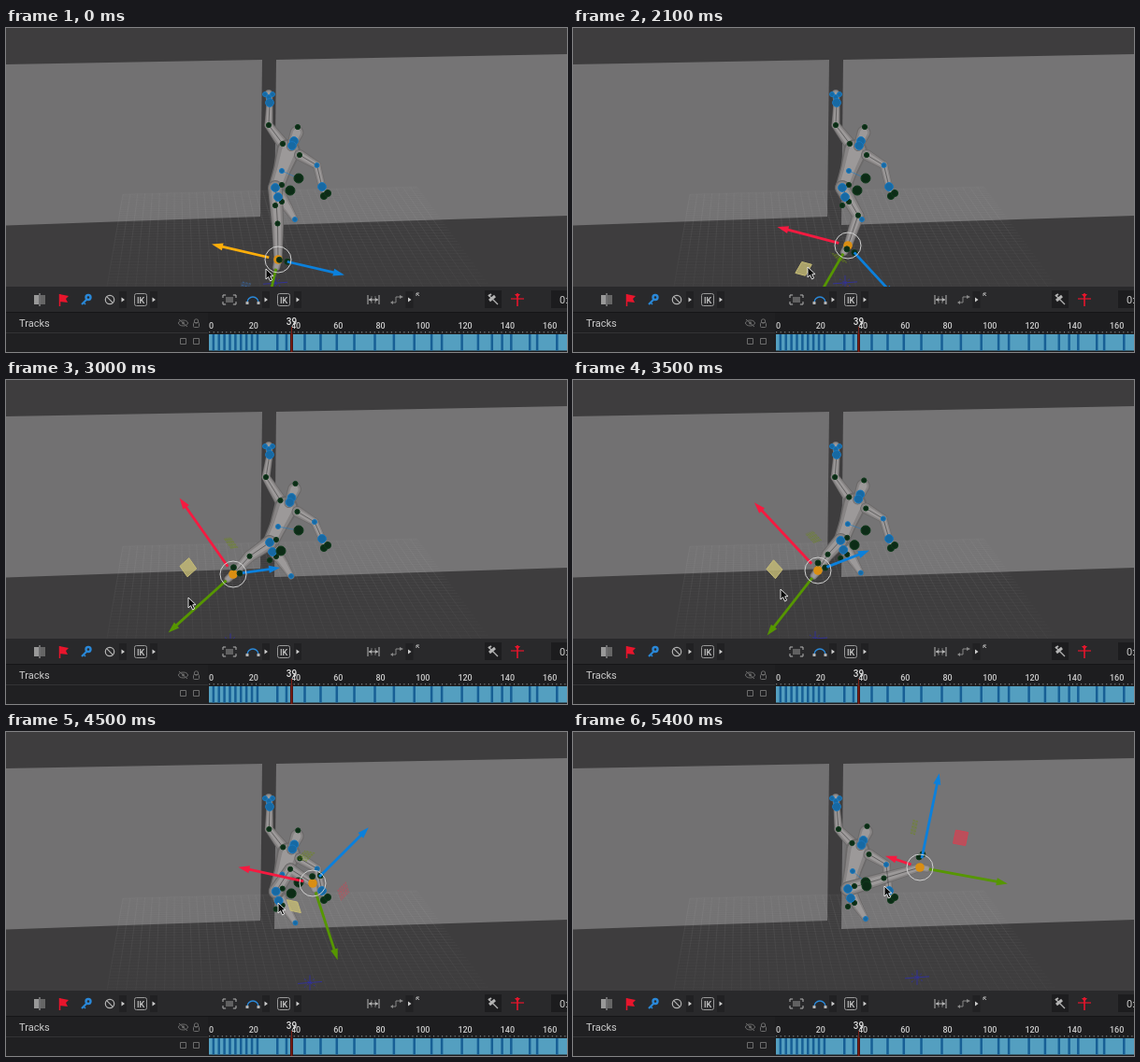
Animation, 600 px wide and 347 px high, one loop 5.5 s. Source, as an HTML page with a canvas:

```html
<!DOCTYPE html>
<html lang="en">
<head>
<meta charset="utf-8">
<title>Character rig posing</title>
<style>
html, body { margin: 0; width: 100%; height: 100%; overflow: hidden; background: #3e3d3e; }
canvas { display: block; }
</style>
</head>
<body>
<canvas id="stage" width="600" height="347"></canvas>
<script>
const LOOP = 5500, STEP = 100, VIEW_H = 277, AXIS = 103;
const c = document.getElementById('stage').getContext('2d');

// The dragged foot: position, knee bend, and gizmo orientation in degrees.
const poses = [
  { at: 600, x: 291, y: 248, bend: 1, heading: 103, tilt: 0, spin: 45, mx: 278, my: 258 },
  { at: 1200, x: 294, y: 235, bend: 13, heading: 119, tilt: 17, spin: 43, mx: 289, my: 253 },
  { at: 2100, x: 294, y: 233, bend: 14, heading: 120, tilt: 17, spin: 43, mx: 251, my: 256 },
  { at: 3000, x: 243, y: 208, bend: -3, heading: 138, tilt: -25, spin: 16, mx: 195, my: 233 },
  { at: 3500, x: 262, y: 204, bend: -2, heading: 128, tilt: -31, spin: 17, mx: 222, my: 224 },
  { at: 4500, x: 328, y: 162, bend: 20, heading: 72, tilt: -33, spin: 47, mx: 291, my: 183 },
  { at: 4900, x: 371, y: 145, bend: 0, heading: 10.5, tilt: -22, spin: 93, mx: 333, my: 165 }
];

function poseAt(t) {
  const next = Math.max(1, poses.findIndex(p => p.at > t));
  const i = t >= poses.at(-1).at ? poses.length - 1 : next;
  const a = poses[i - 1], b = poses[i];
  const k = Math.min(1, Math.max(0, (t - a.at) / (b.at - a.at)));
  return Object.fromEntries(Object.keys(a).map(key => [key, a[key] + (b[key] - a[key]) * k]));
}

const add = ([x, y], [dx, dy], k = 1) => [x + dx * k, y + dy * k];
const rad = deg => deg * Math.PI / 180;

// Screen projection of the three perpendicular gizmo axes.
function axesOf(pose) {
  const h = rad(pose.heading), s = rad(pose.spin), depth = Math.sin(rad(pose.tilt));
  const project = (along, across) => [
    AXIS * (along * Math.cos(h) - across * Math.sin(h)),
    AXIS * (along * Math.sin(h) + across * Math.cos(h))
  ];
  return {
    red: project(depth * Math.sin(s), Math.cos(s)),
    green: project(Math.cos(rad(pose.tilt)), 0),
    blue: project(depth * Math.cos(s), -Math.sin(s))
  };
}

function poly(points, fill) {
  c.fillStyle = fill;
  c.beginPath();
  points.forEach(p => c.lineTo(...p));
  c.fill();
}
function line(points, color, width = 1, close = false) {
  c.strokeStyle = color;
  c.lineWidth = width;
  c.beginPath();
  points.forEach(p => c.lineTo(...p));
  if (close) c.closePath();
  c.stroke();
}
function rect(x, y, w, h, fill) {
  c.fillStyle = fill;
  c.fillRect(x, y, w, h);
}
function box(x, y, w, h, color, r = 0) {
  c.strokeStyle = color;
  c.lineWidth = 1;
  c.beginPath();
  c.roundRect(x, y, w, h, r);
  c.stroke();
}
function dot([x, y], r, fill, stroke, width = 1) {
  c.beginPath();
  c.arc(x, y, r, 0, 7);
  if (fill) { c.fillStyle = fill; c.fill(); }
  if (stroke) { c.strokeStyle = stroke; c.lineWidth = width; c.stroke(); }
}
function text(s, x, y, size, color, weight = 400, align = 'center') {
  c.font = `${weight} ${size}px Roboto, sans-serif`;
  c.textAlign = align;
  c.fillStyle = color;
  c.fillText(s, x, y);
}
const blueDots = (r, ...points) => points.forEach(p => dot(p, r, '#1769a3', '#1a78bd'));
const greenDots = (r, ...points) => points.forEach(p => dot(p, r, '#0c2b16', '#0f3a1b'));

// Tapered limb through [point, radius] joints, with a lighter core.
function limb(...joints) {
  for (const [scale, shade] of [[1, '#6b6969'], [.85, '#878484'], [.55, '#9c9999']]) {
    c.fillStyle = shade;
    for (let i = 1; i < joints.length; i++) {
      const [[a, ra], [b, rb]] = [joints[i - 1], joints[i]];
      const dir = Math.atan2(b[1] - a[1], b[0] - a[0]), q = Math.PI / 2;
      c.beginPath();
      c.arc(...a, ra * scale, dir + q, dir + 3 * q);
      c.arc(...b, rb * scale, dir - q, dir + q);
      c.fill();
    }
  }
}

function drawRoom() {
  rect(0, 0, 600, VIEW_H, '#3e3d3e');
  poly([[0, 39], [274, 34], [272, 202], [0, 211.5]], '#727172');
  poly([[289, 34], [600, 28], [600, 201], [287, 211]], '#757475');

  const fade = c.createLinearGradient(0, 168, 0, VIEW_H);
  fade.addColorStop(0, 'rgba(190,190,190,.05)');
  fade.addColorStop(.25, 'rgba(180,180,180,.1)');
  fade.addColorStop(1, 'rgba(130,130,130,.06)');
  for (let k = 0; k <= 1; k += 1 / 40) {
    line([[125 + 315 * k, 178 - 8 * k], [108 + 410 * k, 277]], fade);
    const depth = k ** 1.4;
    line([[125 - 17 * depth, 178 + 99 * depth], [440 + 78 * depth, 170 + 107 * depth]], fade, .6);
  }
}

function drawBody(pose, axes) {
  // The body follows when the foot is dragged far to either side.
  const lean = Math.max(-1, ((300 - pose.x) / 57) ** 3);
  const up = (x, y) => add([x, y], [-2.5, 5], lean);
  const low = (x, y) => add([x, y], [-6, 3], lean);
  const foot = [pose.x, pose.y], hip = low(288, 171), waist = add([295, 153], [-4, 4], lean);
  const dx = foot[0] - hip[0], dy = foot[1] - hip[1];
  const knee = add([hip[0] + dx / 2, hip[1] + dy / 2], [dy, -dx], pose.bend / Math.hypot(dx, dy));
  const toe = add(add(foot, axes.red, .08), axes.blue, .1), ball = add(foot, axes.blue, .14);
  const otherFoot = add([309, 205], [-4, 5], lean);
  const wrist = [282, 80], elbow = add([281, 104], [-3, 0], lean), hand = [338, 170];
  const shoulder = up(296, 124), rightShoulder = up(314, 136), rightElbow = up(332.5, 147);
  const poleA = [313, 161], poleB = add([304, 174], [-10, 9], lean);

  limb([low(292, 178), 7.5], [add(otherFoot, [-8, -13]), 5.5], [otherFoot, 3.5]);
  limb([shoulder, 6.5], [elbow, 4.5], [wrist, 3.5], [[281, 70], 4]);
  limb([up(302, 132), 13], [waist, 9.5], [low(289, 171), 8.5]);
  limb([rightShoulder, 6], [rightElbow, 4.5], [hand, 4], [[343, 179], 3]);
  limb([up(305, 127), 5], [up(311, 112), 7.5]);
  limb([hip, 8], [knee, 6.5], [foot, 4.5], [add(foot, axes.green, .08), 4]);

  const bone = 'rgba(50,50,50,.55)';
  line([waist, poleA], 'rgba(30,125,195,.55)');
  line([shoulder, elbow, wrist], bone);
  line([rightShoulder, rightElbow, hand], bone);
  line([hip, knee, foot], bone);

  blueDots(2.5, [277, 71], [285, 71], [281, 74], waist, rightElbow, otherFoot);
  greenDots(2.6, elbow, shoulder, up(312, 106), rightShoulder, low(295, 168), low(288, 190),
    low(295, 186), knee);
  blueDots(4.4, wrist, up(308, 121), up(306, 126), hip, low(291, 181), hand);
  greenDots(5, poleA, poleB);
  greenDots(3.6, [340, 180], [344, 177]);
  dot(foot, 4.8, '#d98e12');
  greenDots(3, toe, ball);
}

function arrow(from, axis, color) {
  const len = Math.hypot(...axis), [ux, uy] = axis.map(v => v / len);
  const along = (d, side = 0) => [from[0] + ux * d - uy * side, from[1] + uy * d + ux * side];
  line([along(10), along(len - 8)], color, 2.8);
  poly([along(len), along(len - 12, 4), along(len - 12, -4)], color);
}

// Square handle between two axes, hidden when seen nearly edge-on.
function planeHandle(foot, u, v, rgb, solid) {
  if (Math.abs(u[0] * v[1] - u[1] * v[0]) < .26 * AXIS ** 2) return;
  const corner = (i, j) => add(add(foot, u, .38 + i * .07), v, .38 + j * .07);
  const outline = [corner(-1, -1), corner(1, -1), corner(1, 1), corner(-1, 1)];
  poly(outline, `rgba(${rgb},${solid ? .8 : .2})`);
  if (solid) return line(outline, `rgb(${rgb})`, 1, true);
  c.setLineDash([2, 1.5]);
  for (let j = -1; j <= 1; j += .5) line([corner(-1, j), corner(1, j)], `rgba(${rgb},.6)`);
  c.setLineDash([]);
}

function drawGizmo(pose, { red, green, blue }, t) {
  const foot = [pose.x, pose.y];
  const onPlane = t >= 1900 && t < 4800;
  planeHandle(foot, red, green, onPlane ? '198,188,118' : '55,115,190', onPlane);
  planeHandle(foot, red, blue, '110,140,20');
  planeHandle(foot, green, blue, '205,70,85', t >= 4800);

  const gx = pose.x - 3, gy = 273 + (293 - pose.x) * .13, ground = 'rgba(45,45,185,.7)';
  line([[gx - 13, gy + 1], [gx + 13, gy - 1]], ground);
  line([[gx, gy - 8], [gx, gy + 8]], ground);
  c.setLineDash([2, 2]);
  line([[gx - 6, gy + 5], [gx + 6, gy - 5]], ground);
  line([[gx - 6, gy - 4], [gx + 6, gy + 4]], ground);
  c.setLineDash([]);

  arrow(foot, green, t >= 700 && t < 1700 ? '#f8e83c' : '#569600');
  arrow(foot, blue, '#0b80dc');
  arrow(foot, red, t < 700 ? '#ffae0a' : '#f51a40');
  dot(foot, 14, null, '#d0d0d0');
}

function drawCursor(x, y) {
  const shape = [[0, 0], [0, 11], [2.6, 8.6], [4.6, 13], [6.6, 12], [4.7, 7.8], [8, 7.6]]
    .map(p => add(p, [x, y]));
  poly(shape, '#080808');
  line(shape, '#f2f2f2', .9, true);
}

function ikButton(x) {
  box(x - 6.5, 284.5, 13, 13, '#999', 2);
  text('IK', x, 294.5, 9, '#ccc', 500);
}
function menuArrow(x) {
  rect(x - 4, 282, 8, 18, '#212123');
  poly([[x - 1.5, 288.5], [x + 2, 291], [x - 1.5, 293.5]], '#ccc');
}
function frameIcon(x, w, color) {
  for (const s of [-w, w])
    for (const r of [-5, 5])
      line([[x + s, 291 + r * .4], [x + s, 291 + r], [x + s * .55, 291 + r]], color);
}

function drawToolbar() {
  const light = '#b4b4b4', red = '#e8152c', blue = '#2a88d8';
  rect(0, VIEW_H, 600, 28, '#29292b');
  rect(30, 286, 5, 10, '#999');
  rect(37, 286, 5, 10, '#666');
  line([[36, 284], [36, 298]], light);

  line([[57.5, 285], [57.5, 298]], red, 1.5);
  poly([[57, 285], [67, 287], [64, 290], [66, 294], [57, 293]], red);
  line([[81, 296], [87, 290]], blue, 2.2);
  line([[83, 294], [85, 296]], blue, 1.6);
  dot([88, 288.5], 2.5, null, blue, 2.4);
  dot([111, 291], 4.7, null, light, 1.2);
  line([[107.7, 287.7], [114.3, 294.3]], light, 1.2);
  [125, 158, 278, 312, 431.5].forEach(menuArrow);
  [144, 297].forEach(ikButton);

  frameIcon(239, 7, light);
  for (const y of [289, 291, 293]) line([[235, y], [243, y]], light, .8);
  c.strokeStyle = blue;
  c.lineWidth = 1.4;
  c.beginPath();
  c.arc(264, 294, 6, Math.PI, 0);
  c.stroke();
  rect(256.5, 293, 3, 3, light);
  rect(268.5, 293, 3, 3, light);

  for (const s of [-1, 1]) {
    line([[393 + s * 6, 286], [393 + s * 6, 296]], light);
    line([[393 + s * 2, 287], [393 + s * 2, 295]], '#777');
    poly([[393 + s * 5, 291], [393 + s * 2, 289], [393 + s * 2, 293]], light);
  }
  line([[388, 291], [398, 291]], light);
  line([[412, 294], [417, 294], [417, 288], [423, 288]], '#888');
  poly([[421, 286], [425, 288], [421, 290]], '#888');
  poly([[414, 292], [411, 294], [414, 296]], '#888');
  line([[442, 287], [439, 284]], light);
  line([[439, 287], [439, 284], [442, 284]], light);

  rect(512, 281, 18, 19, '#1d1d1f');
  line([[516, 286], [526, 296]], light, 1.2);
  line([[517, 292], [523, 287]], light, 3);
  line([[516, 287], [519, 285]], light, 2);
  line([[540, 290], [554, 290]], red, 1.2);
  line([[547, 284], [547, 298]], red, 1.6);
  poly([[544, 285], [550, 285], [547, 289]], red);
  rect(583, 281, 17, 19, '#1c1c1e');
  text('0:', 592, 295, 11, '#ccc', 400, 'left');
}

function drawTimeline() {
  rect(0, 304, 600, 43, '#202022');
  rect(0, 304, 600, 1, '#151517');
  rect(0, 326, 217, 1, '#333335');
  text('Tracks', 14, 319.7, 11, '#ccc', 400, 'left');
  c.strokeStyle = '#6c6c6c';
  c.lineWidth = 1;
  c.beginPath();
  c.ellipse(189.5, 316, 5, 3, 0, 0, 7);
  c.stroke();
  dot([189.5, 316], 1.4, '#6c6c6c');
  line([[185, 312], [194, 320]], '#6c6c6c');
  box(200.5, 315.5, 6, 5, '#6c6c6c', 1);
  dot([203.5, 314], 2.2, null, '#6c6c6c');
  for (const x of [186.5, 200.5]) box(x, 332.5, 6, 6, '#6c6c6c');

  rect(216, 305, 384, 42, '#1d1d1f');
  const frameX = f => 217.2 + 2.263 * f;
  for (let f = 0; f < 170; f += 2) rect(frameX(f), 325, 1, 1.5, '#808080');
  rect(217, 328, 383, 17.5, '#549fc0');
  // Keys: dense at the start, then at seeded random gaps.
  let seed = 7;
  for (let f = 1.5; f < 169; f += f < 20 ? 2.6 : 3 + seed % 100 / 14) {
    seed = seed * 73 % 1009;
    rect(frameX(f), 328, 2.5, 17.5, '#175f95');
  }
  for (let f = 0; f <= 160; f += 20) text(f, frameX(f) + 2.3, 322, 9, '#ccc', 500);
  rect(304, 327, 3, 20, '#4a1210');
  rect(305, 320, 1, 27, '#7c2018');
  text('39', 305.5, 317.5, 10, '#e4e4e4', 500);
}

const start = performance.now();
function draw() {
  const t = Math.floor((performance.now() - start) % LOOP / STEP) * STEP;
  const pose = poseAt(t), axes = axesOf(pose);
  c.save();
  c.beginPath();
  c.rect(0, 0, 600, VIEW_H);
  c.clip();
  drawRoom();
  drawBody(pose, axes);
  drawGizmo(pose, axes, t);
  c.restore();
  drawToolbar();
  drawTimeline();
  drawCursor(pose.mx, pose.my);
  requestAnimationFrame(draw);
}
draw();
</script>
</body>
</html>
```
